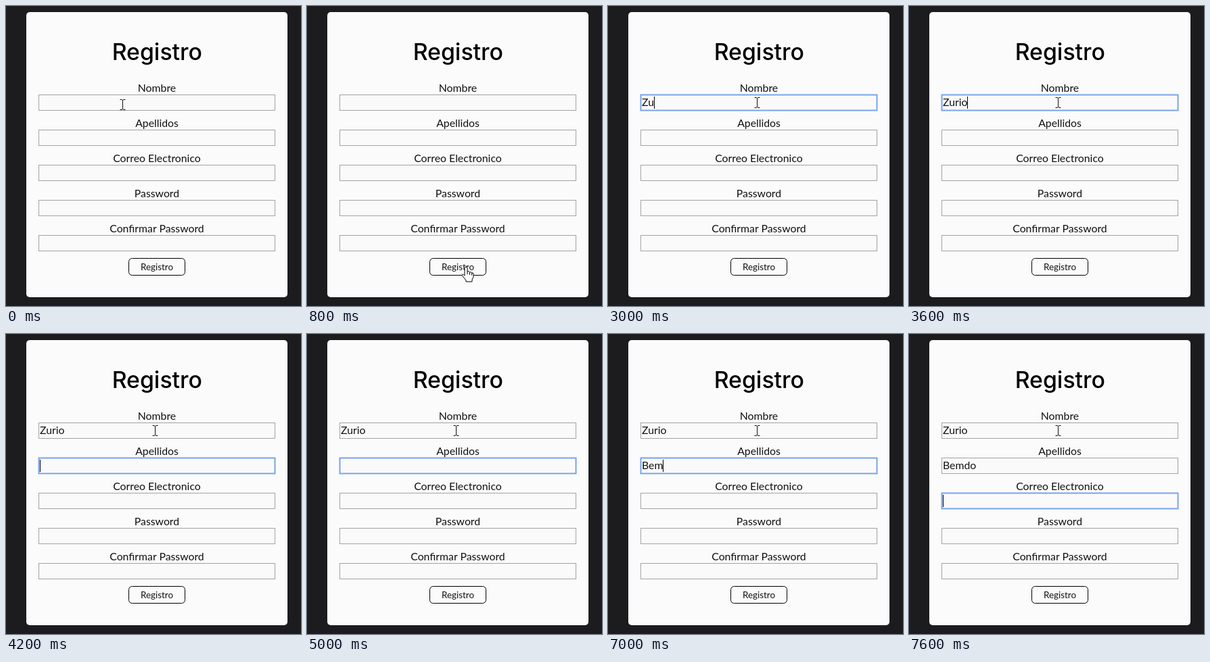
Animation of 436x444 px, one loop 8000 ms. Source, as an HTML page:

```html
<!DOCTYPE html>
<html lang="es">
<head>
<meta charset="utf-8">
<title>Registro</title>
<style>
  html, body { margin: 0; width: 100%; height: 100%; overflow: hidden; background: #1c1b1d; }
  svg { display: block; }
  text { font: 15.8px Lato, sans-serif; fill: #111; }
  .title { font: 500 33.8px Inter, sans-serif; fill: #000; }
  .button { font-size: 13.4px; }
  .hint { font: 13.2px "Open Sans", sans-serif; fill: #333; }
  .middle { text-anchor: middle; }
  .field { fill: #fafafb; stroke: #a2a29e; }
  .field.focus { stroke: #78a4ea; stroke-width: 2; }
  #bubble { filter: drop-shadow(3px 3px 2px #b4b4d8); }
</style>
</head>
<body>
<svg width="436" height="444" viewBox="0 0 436 444">
  <rect width="436" height="444" fill="#1c1b1d"/>
  <rect x="30" y="9" width="386" height="422" rx="5" fill="#fbfbfc"/>
  <text class="title middle" x="223.3" y="80">Registro</text>
  <g id="form"></g>
  <rect x="181.5" y="373.5" width="83" height="25" rx="5" fill="#fbfbfc" stroke="#000"/>
  <text class="button middle" x="223" y="391">Registro</text>
  <rect id="caret" width="1" height="18" fill="#000"/>
  <g id="bubble">
    <path d="M136 163.5H141L149 155.5L157 163.5H309Q313.5 163.5 313.5 168V202Q313.5 206.5 309 206.5H136Q131.5 206.5 131.5 202V168Q131.5 163.5 136 163.5Z" fill="#fbfbfc" stroke="#a3a3a8"/>
    <rect x="140" y="172" width="23" height="23" rx="2" fill="#ff9c10"/>
    <path d="M149.5 176H153.5L153 186H150ZM149.8 188H153.2V191.2H149.8Z" fill="#fff"/>
    <text class="hint" x="171" y="190">Completa este campo</text>
  </g>
  <g id="cursor">
    <path id="beam" d="M-3.5 -7.5H-1L.5 -6.5L2 -7.5H4.5M.5 -6.5V6.5M-3.5 7.5H-1L.5 6.5L2 7.5H4.5" fill="none" stroke="#111"/>
    <path id="arrow" d="M0 0V16L4 12.5L6.5 18.5L9 17.5L6.5 11.5H11.5Z" fill="#fff" stroke="#000"/>
    <g id="hand" stroke="#000" stroke-linejoin="round">
      <path d="M-2 13V1.5Q0 -1.5 2 1.5V7Q4 5.5 5.5 8Q7.5 6.5 8.5 9Q11 8 11 11V15L9 19V22H0V20L-6 12.5Q-5.5 9.5 -2 13Z" fill="#fff"/>
      <path d="M2 7V11M5.5 8V12M8.5 9V12.5" fill="none"/>
    </g>
  </g>
</svg>
<script>
const LOOP = 8000;
const byId = id => document.getElementById(id);
const show = (el, on) => { el.style.display = on ? "" : "none"; };

const labels = ["Nombre", "Apellidos", "Correo Electronico", "Password", "Confirmar Password"];
byId("form").innerHTML = labels.map((label, i) => {
  const y = 131 + 52 * i;
  return `<text class="middle" x="223" y="${y - 4}">${label}</text>
    <rect class="field" x="48.5" y="${y + 0.5}" width="349" height="23"/>
    <text class="value" x="50" y="${y + 17}"></text>`;
}).join("");
const fields = [...document.querySelectorAll(".field")];
const values = [...document.querySelectorAll(".value")];

const entries = [
  { text: "Zurio", keys: [2600, 3000, 3200, 3400, 3600] },
  { text: "Bemdo", keys: [6400, 6600, 7000, 7200, 7400] }
];
const focusTimes = [1000, 4200, 7600];
const path = [[0, 172, 146], [400, 172, 146], [800, 235, 386], [1400, 235, 386],
  [2000, 244, 146], [2400, 220, 143], [LOOP, 220, 143]];

function cursorAt(t) {
  const i = path.findIndex(p => p[0] > t);
  const [t0, x0, y0] = path[i - 1], [t1, x1, y1] = path[i];
  const u = (t - t0) / (t1 - t0), k = u * u * (3 - 2 * u);
  return [x0 + (x1 - x0) * k, y0 + (y1 - y0) * k].map(Math.round);
}

function drawCaret(t, active) {
  const resets = [...focusTimes, ...entries.flatMap(e => e.keys)].filter(s => s <= t);
  const blinkStart = Math.max(...resets);
  const on = active >= 0 && Math.floor((t - blinkStart) / 500) % 2 === 0;
  show(byId("caret"), on);
  if (!on) return;
  byId("caret").setAttribute("x", 50 + Math.round(values[active].getComputedTextLength()));
  byId("caret").setAttribute("y", 134 + 52 * active);
}

function draw(t) {
  const active = focusTimes.filter(s => s <= t).length - 1;
  fields.forEach((field, i) => field.classList.toggle("focus", i === active));
  entries.forEach(({ text, keys }, i) => {
    values[i].textContent = text.slice(0, keys.filter(k => k <= t).length);
  });
  drawCaret(t, active);
  show(byId("bubble"), t >= 1200 && t < 2600);

  const [x, y] = cursorAt(t);
  byId("cursor").setAttribute("transform", `translate(${x} ${y})`);
  show(byId("beam"), y < 160);
  show(byId("arrow"), y >= 160 && y < 373);
  show(byId("hand"), y >= 373);
}

function tick() {
  draw(Math.floor(performance.now() % LOOP / 200) * 200);
  requestAnimationFrame(tick);
}
tick();
</script>
</body>
</html>
```
